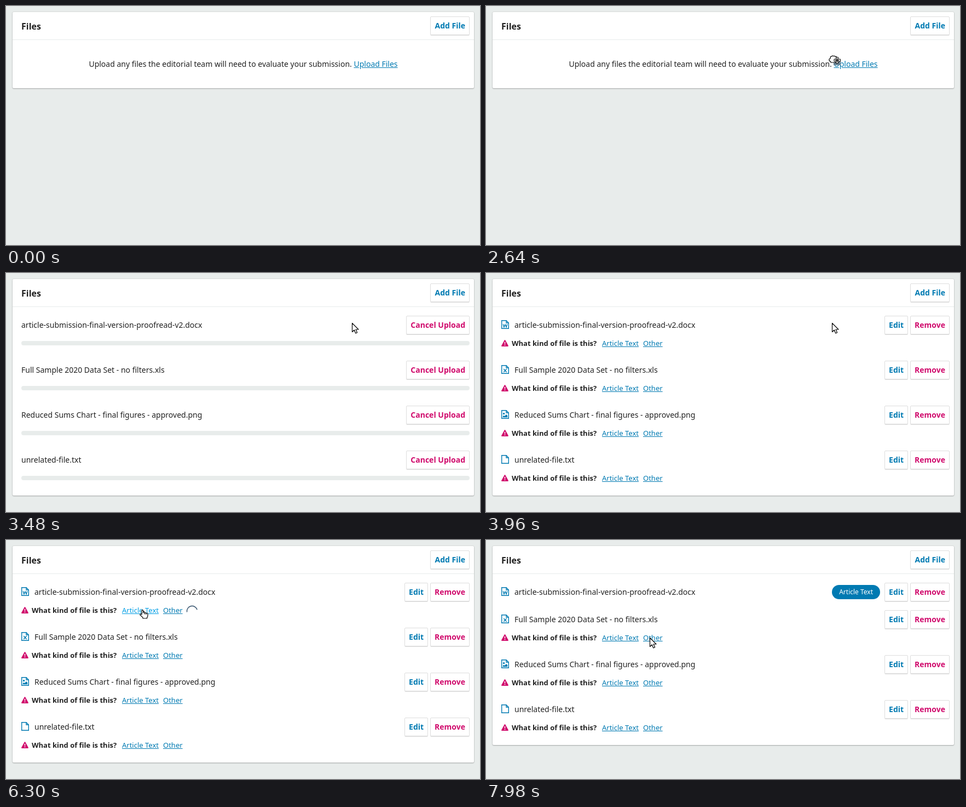
An HTML page that plays this animation: 866x436 px, repeating every 8000 ms.

```html
<!DOCTYPE html>
<html lang="en">
<head>
<meta charset="utf-8">
<title>File upload</title>
<style>
  html, body { margin: 0; width: 100%; height: 100%; overflow: hidden; }
  body { position: relative; background: #e8eceb; color: #222; font: 14px/34px "Noto Sans", sans-serif; white-space: nowrap; }
  #card { position: absolute; left: 12px; top: 11px; width: 843px; background: #fff; border-radius: 2px; box-shadow: 0 0 2px rgba(0,0,0,.2), 0 1px 2px rgba(0,0,0,.25); }
  header { height: 50px; border-bottom: 1px solid #e8eceb; }
  h1 { margin: 0 0 0 16px; font-size: 16px; line-height: 52px; }
  .empty { line-height: 88px; text-align: center; }
  .list { padding: 8px 0; }
  .row { position: relative; height: 34px; padding: 8px 16px; }
  .row.tall { height: 66px; }
  .row > * { position: absolute; }
  .side { position: absolute; right: 8px; top: 8px; display: flex; gap: 4px; align-items: center; }
  .btn { box-sizing: border-box; height: 34px; padding: 0 7px; border: 1px solid #ddd; border-radius: 2px; box-shadow: 0 1px 0 #ddd; font-weight: 700; line-height: 32px; color: #007ab2; }
  .btn.warn { color: #d00a6c; }
  .badge { box-sizing: border-box; height: 26px; margin-right: 4px; padding: 0 13px; border-radius: 13px; background: #007ab2; color: #fff; font-size: 12px; line-height: 26px; }
  .bar { left: 16px; top: 54px; width: 819px; height: 8px; border-radius: 4px; background: #e8eceb; overflow: hidden; }
  .bar i { display: block; width: var(--done); height: 8px; border-radius: 4px; background: #007ab2; }
  .ask { left: 16px; top: 42px; font-size: 13px; line-height: 32px; }
  .ask > * { position: absolute; }
  .ask b { left: 19px; }
  .link { color: #007ab2; text-decoration: underline; }
  .hover .row:first-child .link:nth-of-type(1) { color: #009ee5; }
  svg { position: absolute; overflow: visible; }
  .icon { left: 16px; top: 16px; fill: none; stroke: #007ab2; stroke-width: 1.4; }
  #pointer, #spinner { left: 0; top: 0; }
  #pointer { stroke: #000; fill: #fff; stroke-linejoin: round; }
</style>
</head>
<body>
<div id="card"></div>
<svg id="spinner" width="1" height="1"><path d="M-9.4 1.5A9.5 9.5 0 0 1 9.1-2.7" fill="none" stroke="#47627a" stroke-width="1.6"/></svg>
<svg id="pointer" width="1" height="1">
  <path id="arrow" stroke-width="1.2" d="M.5.5V16.5L4.2 13 6.8 19 9.6 17.8 7 12H12Z"/>
  <g id="hand" transform="translate(-5 0)" stroke-width="1.2">
    <path d="M4 9V2Q4 .6 5.3.6T6.6 2V6Q8-.0 9.3 6 10.8 4.7 12 6.6 14.8 5.6 15 8V11Q15 13 13.6 14.5V16H6V14.4L1 9.8Q.6 7.6 2.2 7.8Z"/>
    <path d="M9.3 6V8.5M12 6.6V9"/>
  </g>
  <g id="fist" transform="translate(-8 -1)">
    <path d="M9 10H22V18H9Z" fill="#6b8596" stroke="none"/>
    <path stroke-width="1.2" d="M3 6Q3 1.2 5.5 2 7-.2 8.6 1.6 10.5.2 11.8 2.2 15 1.5 15 5V8L13 13H4.5L1 9Q.2 6 3 6Z"/>
    <path d="M13.5 3.5H17.5V7H21.5V11H17.5V14.5H13.5V11H10V7H13.5Z"/>
    <path d="M15.5 5.5V12.5M12 9H19" stroke-width="1.6"/>
  </g>
</svg>
<script>
const LOOP = 8000, STEP = 60;
const $ = id => document.getElementById(id);

const files = [
  ['article-submission-final-version-proofread-v2.docx', '<path d="M3.3 7.3 4.9 12.7 7 8 9.1 12.7 10.7 7.3"/>'],
  ['Full Sample 2020 Data Set - no filters.xls', '<path d="M4.3 7 9.7 13M9.7 7 4.3 13"/>'],
  ['Reduced Sums Chart - final figures - approved.png',
   '<path d="M2.8 13.2V11.5L4.5 9.8 6 11.2 9 8 11.2 10.2V13.2Z" fill="#007ab2" stroke="none"/><circle cx="4.6" cy="6.6" r="1" fill="#007ab2"/>'],
  ['unrelated-file.txt', '']
];

const button = (label, kind = '') => `<div class="btn ${kind}">${label}</div>`;
const side = html => `<div class="side">${html}</div>`;
const link = (label, x) => `<span class="link" style="left:${x}px">${label}</span>`;
const icon = mark => `<svg class="icon" width="14" height="16"><path d="M.7.7H9L13.3 5V15.3H.7ZM9 .7V5H13.3"/>${mark}</svg>`;
const question = `<div class="ask">
  <svg style="left:0;top:10px" width="13" height="12"><path d="M6.5 1 12 11H1Z" fill="#d00a6c" stroke="#d00a6c" stroke-width="1.8" stroke-linejoin="round"/><path d="M6.5 3.7V7.3M6.5 8.6V10.2" stroke="#fff" stroke-width="1.6"/></svg>
  <b>What kind of file is this?</b>${link('Article Text', 184)}${link('Other', 259)}</div>`;

const uploading = ([name]) => `<div class="row tall"><span>${name}</span>
  ${side(button('Cancel Upload', 'warn'))}<div class="bar"><i></i></div></div>`;

function uploaded([name, mark], labelled) {
  const badge = labelled ? '<div class="badge">Article Text</div>' : '';
  return `<div class="row ${labelled ? '' : 'tall'}">${icon(mark)}<span style="left:40px">${name}</span>
    ${side(badge + button('Edit') + button('Remove', 'warn'))}${labelled ? '' : question}</div>`;
}

const list = row => `<div class="list">${files.map(row).join('')}</div>`;
const views = [
  '<div class="empty">Upload any files the editorial team will need to evaluate your submission. <span class="link">Upload Files</span></div>',
  list(uploading),
  list(f => uploaded(f, false)),
  list((f, i) => uploaded(f, i === 0))
];
const starts = [0, 3360, 3960, 6420];

// Pointer path: time, x, y of the hotspot
const path = [
  [1320, 842, 188], [1560, 745, 140], [1920, 690, 112], [2220, 690, 112], [2640, 634, 91], [3000, 632, 91],
  [4680, 632, 91], [4800, 450, 101], [4920, 325, 113], [5040, 270, 120], [5280, 249, 127],
  [6900, 249, 127], [7320, 284, 165], [7680, 298, 177], [7920, 298, 177], [7980, 299, 178]
];

function pointerAt(t) {
  const i = path.findIndex(p => p[0] >= t);
  if (i < 0) return path[path.length - 1].slice(1);
  const b = path[i], a = path[Math.max(i - 1, 0)];
  const k = b[0] > a[0] ? (t - a[0]) / (b[0] - a[0]) : 0;
  return [1, 2].map(n => a[n] + (b[n] - a[n]) * k);
}

const show = (id, on) => $(id).style.display = on ? '' : 'none';
const between = (t, a, b) => t >= a && t < b;
let current = -1;

function draw(t) {
  const view = starts.filter(s => t >= s).length - 1;
  if (view !== current) {
    current = view;
    $('card').innerHTML = `<header><h1>Files</h1>${side(button('Add File'))}</header>${views[view]}`;
  }
  const onLink = between(t, 4980, 6420);
  $('card').className = onLink ? 'hover' : '';
  $('card').style.setProperty('--done', Math.max(0, Math.min(1, (t - 3480) / 420)) * 100 + '%');

  show('spinner', between(t, 5820, 6420));
  $('spinner').style.transform = `translate(340px, 130px) rotate(${(t - 6300) * .6}deg)`;

  const dragging = t < 3000;
  show('pointer', t >= 1320);
  show('fist', dragging);
  show('hand', onLink);
  show('arrow', !dragging && !onLink);
  const [x, y] = pointerAt(t).map(Math.round);
  $('pointer').style.transform = `translate(${x}px, ${y}px)`;
}

const begin = performance.now();
function tick() {
  const t = (performance.now() - begin) % LOOP;
  draw(Math.floor(t / STEP) * STEP);
  requestAnimationFrame(tick);
}
tick();
</script>
</body>
</html>
```
